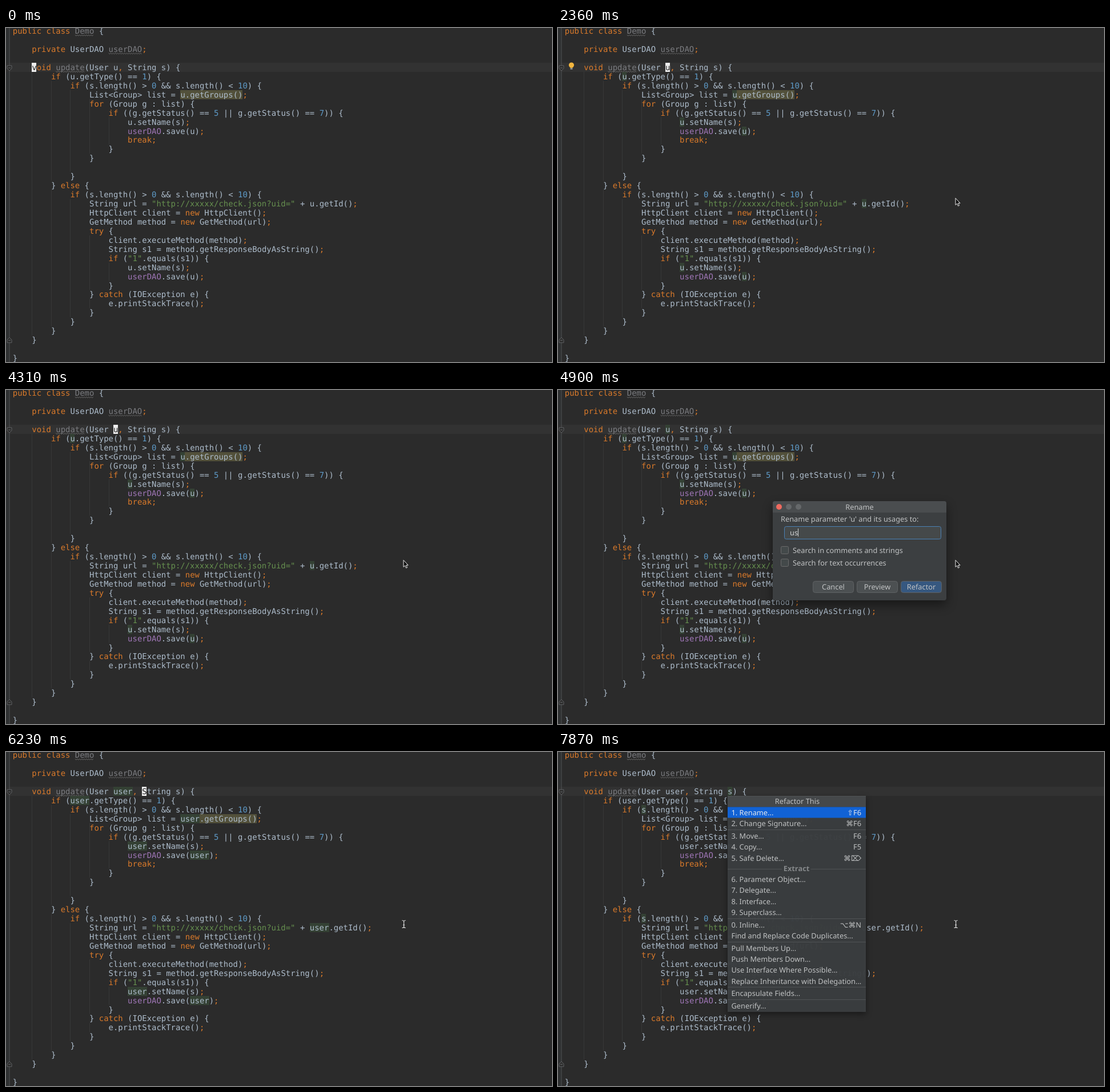
An HTML page with a canvas that plays this animation: 956 by 586 pixels, repeating every 8 s.

```html
<!DOCTYPE html>
<html lang="en">
<head>
<meta charset="utf-8">
<title>Rename refactoring</title>
<style>
  html, body { margin: 0; width: 100%; height: 100%; overflow: hidden; background: #2b2b2b; }
  canvas { display: block; }
</style>
</head>
<body>
<canvas id="stage" width="956" height="586"></canvas>
<script>
const ctx = document.getElementById('stage').getContext('2d');
const LOOP = 8000;
const X0 = 11.8, COL = 8.388, ROW = 15.94, TOP = -2.7, ASCENT = 12.9;
const MONO = '13.93px "DejaVu Sans Mono", monospace';
const UI = '12.8px "Noto Sans", "DejaVu Sans", sans-serif';
const COLOR = {
  bg: '#2b2b2b', line: '#323232', text: '#adbccb', keyword: '#da7a2b', string: '#66904f',
  number: '#5f9cca', field: '#a077b8', unused: '#7b7c80', usage: '#344134', warn: '#52503a',
  brace: '#3b514d', panel: '#3c3f41', label: '#c0c2c3'
};

const SOURCE = `public class Demo {

    private UserDAO userDAO;

    void update(User u, String s) {
        if (u.getType() == 1) {
            if (s.length() > 0 && s.length() < 10) {
                List<Group> list = u.getGroups();
                for (Group g : list) {
                    if ((g.getStatus() == 5 || g.getStatus() == 7)) {
                        u.setName(s);
                        userDAO.save(u);
                        break;
                    }
                }

            }
        } else {
            if (s.length() > 0 && s.length() < 10) {
                String url = "http://xxxxx/check.json?uid=" + u.getId();
                HttpClient client = new HttpClient();
                GetMethod method = new GetMethod(url);
                try {
                    client.executeMethod(method);
                    String s1 = method.getResponseBodyAsString();
                    if ("1".equals(s1)) {
                        u.setName(s);
                        userDAO.save(u);
                    }
                } catch (IOException e) {
                    e.printStackTrace();
                }
            }
        }
    }

}`;
const KEYWORDS = /^(public|class|private|void|if|for|break|else|new|try|catch|[;,])$/;

// column, first row, last row
const GUIDES = [[4, 5, 33], [8, 6, 16], [8, 18, 32], [12, 7, 15], [12, 19, 31],
  [16, 8, 13], [16, 23, 28], [16, 30, 30], [20, 10, 12], [20, 26, 27]];

// time, column of the block caret (-1 hides it)
const CARET = [[0, 4], [140, 9], [440, 15], [590, 16], [890, 21], [1920, -1], [2360, 21],
  [2810, -1], [4310, 21], [4450, -1], [5490, 21], [6230, 27], [6380, 34], [7870, -1]];
const USAGES = [[0, ''], [1330, 'u'], [5490, 'user'], [6970, 's']];
const POINTER = [[0, null], [1770, [841, 302]], [1920, [739, 301]], [2070, [695.5, 298]]];
const MENU = [[0, -1], [2810, 21], [4310, -1], [7870, 34]];
const DIALOG = [[0, null], [4450, 'u'], [4900, 'us'], [5050, 'user'], [5340, null]];

const ITEMS = [['1. Rename...', '⇧F6'], ['2. Change Signature...', '⌘F6'], '-',
  ['3. Move...', 'F6'], ['4. Copy...', 'F5'], ['5. Safe Delete...', '⌘⌦'], 'Extract',
  ['6. Parameter Object...'], ['7. Delegate...'], ['8. Interface...'], ['9. Superclass...'], '-',
  ['0. Inline...', '⌥⌘N'], ['Find and Replace Code Duplicates...'], '-',
  ['Pull Members Up...'], ['Push Members Down...'], ['Use Interface Where Possible...'],
  ['Replace Inheritance with Delegation...'], '-', ['Encapsulate Fields...'], '-', ['Generify...']];

const at = (track, t) => track.filter(step => step[0] <= t).pop()[1];
const colX = c => X0 + c * COL;
const rowY = r => TOP + r * ROW;

function rect(x, y, w, h, fill) {
  ctx.fillStyle = fill;
  ctx.fillRect(x, y, w, h);
}

function roundRect(x, y, w, h, r, fill, stroke) {
  ctx.beginPath();
  ctx.roundRect(x, y, w, h, r);
  ctx.fillStyle = fill;
  ctx.fill();
  if (stroke) {
    ctx.strokeStyle = stroke;
    ctx.lineWidth = 1;
    ctx.stroke();
  }
}

function path(points, close) {
  ctx.beginPath();
  points.forEach(([x, y]) => ctx.lineTo(x, y));
  if (close) ctx.closePath();
}

function write(text, x, y, fill, font = UI, align = 'left') {
  ctx.font = font;
  ctx.textAlign = align;
  ctx.fillStyle = fill;
  ctx.fillText(text, x, y);
}

const cell = (c, r, n, fill) => rect(Math.round(colX(c)), Math.round(rowY(r)), Math.round(n * COL), 16, fill);
const code = (text, c, r, fill) => write(text, colX(c), rowY(r) + ASCENT, fill, MONO);

function wave(c, r, n) {
  const pts = [], y = rowY(r) + ASCENT + 2;
  for (let i = 0; i <= n * COL / 2; i++) pts.push([colX(c) + i * 2, y + (i % 2) * 1.6]);
  path(pts);
  ctx.strokeStyle = '#717171';
  ctx.lineWidth = 0.9;
  ctx.stroke();
}

function tokenColor(word, row) {
  if (KEYWORDS.test(word)) return COLOR.keyword;
  if (word[0] === '"') return COLOR.string;
  if (/^\d/.test(word)) return COLOR.number;
  if (/^(Demo|update)$/.test(word)) return COLOR.unused;
  if (word === 'userDAO') return row < 4 ? COLOR.unused : COLOR.field;
  return COLOR.text;
}

function drawGutter() {
  rect(0, 0, 6, 586, '#2f3132');
  rect(0, 61, 956, 16, COLOR.line);
  rect(5.5, 0, 1, 586, '#505254');
  for (const [y, d] of [[66, 1], [552, -1]]) {
    path([[2, y], [10, y], [10, y + 5 * d], [6, y + 9 * d], [2, y + 5 * d]], true);
    ctx.fillStyle = COLOR.bg;
    ctx.fill();
    ctx.strokeStyle = '#606264';
    ctx.lineWidth = 1;
    ctx.stroke();
    rect(4, y + 4 * d - 0.5, 4, 1, '#707274');
  }
  for (const [c, a, b] of GUIDES) rect(Math.round(colX(c)), rowY(a), 1, (b - a + 1) * ROW, '#373838');
}

function drawCode(t) {
  const renamed = t >= 5490, usage = at(USAGES, t), caret = at(CARET, t);
  const text = renamed ? SOURCE.replace(/\bu\b/g, 'user') : SOURCE;
  cell(35, 7, renamed ? 16 : 13, COLOR.warn);
  text.split('\n').forEach((line, r) => {
    for (const m of line.matchAll(/"[^"]*"|\w+|[^\s\w]/g)) {
      const word = m[0], c = m.index, color = tokenColor(word, r);
      if (word === usage) cell(c, r, word.length, COLOR.usage);
      code(word, c, r, color);
      if (color === COLOR.unused) wave(c, r, word.length);
    }
  });
  const line = text.split('\n')[4];
  if (caret === 15) {
    cell(32, 4, 1, COLOR.brace);
    code(')', 32, 4, '#ffef28');
  }
  if (caret >= 0) {
    cell(caret, 4, 1, '#eeeeee');
    code(line[caret], caret, 4, '#222222');
  }
}

function drawBulb() {
  ctx.beginPath();
  ctx.arc(23.5, 65, 4.6, 0, Math.PI * 2);
  ctx.fillStyle = '#f3b63f';
  ctx.fill();
  rect(21.5, 68, 4, 2, '#f3b63f');
  rect(21.5, 70.5, 4, 2, '#a9abad');
}

function shadow(blur, dy, draw) {
  ctx.save();
  ctx.shadowColor = 'rgba(0,0,0,.45)';
  ctx.shadowBlur = blur;
  ctx.shadowOffsetY = dy;
  draw();
  ctx.restore();
}

function drawMenu(column) {
  const x = Math.round(colX(column)), w = 242, mid = x + w / 2;
  shadow(10, 4, () => rect(x, 77, w, 379, 'rgba(60,63,65,.95)'));
  rect(x, 77, w, 19, '#45484a');
  rect(x, 77, w, 1, '#505355');
  write('Refactor This', mid + 1, 90.5, COLOR.label, UI, 'center');
  rect(x, 96.5, w, 19, '#1162d5');
  let y = 106.2;
  for (const item of ITEMS) {
    if (item === '-') {
      rect(x, Math.round(y - 9), w, 1, '#505355');
      y += 2.3;
    } else if (typeof item === 'string') {
      y -= 0.7;
      rect(x, Math.round(y), 95, 1, '#505355');
      rect(x + 146, Math.round(y), w - 146, 1, '#505355');
      write(item, mid - 0.5, y + 4.6, '#85888a', 'bold ' + UI, 'center');
      y += 18.7;
    } else {
      const color = y < 110 ? '#e4e8ee' : COLOR.label;
      write(item[0], x + 6.5, y + 4.6, color);
      if (item[1]) write(item[1], x + 234, y + 4.6, color, UI, 'right');
      y += 19.35;
    }
  }
}

function drawDialog(name) {
  const fresh = name === 'u';
  shadow(18, 8, () => roundRect(376, 195, 304, 174, 4, COLOR.panel));
  roundRect(376, 195, 304, 20, [4, 4, 0, 0], '#4a4d4f');
  ['#ee6a5f', '#65686a', '#65686a'].forEach((fill, i) => {
    ctx.beginPath();
    ctx.arc(387 + i * 17, 205, 5, 0, Math.PI * 2);
    ctx.fillStyle = fill;
    ctx.fill();
  });
  write('Rename', 528, 209.5, COLOR.label, UI, 'center');
  write("Rename parameter 'u' and its usages to:", 390, 231, COLOR.label);
  roundRect(396.5, 239.5, 274, 22, 3, '#45494a', '#4a81b5');
  if (fresh) rect(406, 242, 8, 16, '#2f65ca');
  write(name, 406, 254.5, '#d0d2d3');
  ctx.font = UI;
  rect(406 + ctx.measureText(name).width, 243, 1, 14, '#d0d2d3');
  ['Search in comments and strings', 'Search for text occurrences'].forEach((label, i) => {
    const y = 274 + i * 22;
    roundRect(390.5, y + 0.5, 13, 13, 2, '#43494a', '#6b6b6b');
    write(label, 411, y + 11.5, COLOR.label);
  });
  ['Cancel', 'Preview', 'Refactor'].forEach((label, i) => {
    const x = 446.5 + i * 77, off = fresh && i > 0;
    const fill = off ? '#404345' : i === 2 ? '#365880' : '#4c5052';
    roundRect(x, 335.5, 71, 20, 4, fill, '#5e6163');
    write(label, x + 35.5, 350, off ? '#777777' : COLOR.label, UI, 'center');
  });
}

function drawPointer(t) {
  const spot = at(POINTER, t);
  if (!spot) return;
  ctx.save();
  if (t < 5340) {
    ctx.translate(...spot);
    path([[0.5, 0.5], [0.5, 12.5], [3.2, 10], [5, 14.3], [7, 13.4], [5.2, 9.3], [8.6, 9.3]], true);
    ctx.fillStyle = '#111111';
    ctx.fill();
    ctx.strokeStyle = '#eeeeee';
    ctx.lineWidth = 1;
    ctx.stroke();
  } else {
    ctx.strokeStyle = '#d8d8d8';
    ctx.lineWidth = 1.2;
    ctx.beginPath();
    for (const [y, d] of [[295.5, 1], [308.5, -1]]) {
      ctx.moveTo(693.5, y);
      ctx.quadraticCurveTo(696.6, y, 696.6, y + 2 * d);
      ctx.quadraticCurveTo(696.6, y, 699.7, y);
    }
    ctx.moveTo(696.6, 297);
    ctx.lineTo(696.6, 307);
    ctx.moveTo(695, 303.5);
    ctx.lineTo(698.2, 303.5);
    ctx.stroke();
  }
  ctx.restore();
}

function draw(t) {
  ctx.textRendering = 'geometricPrecision';
  rect(0, 0, 956, 586, COLOR.bg);
  drawGutter();
  drawCode(t);
  if (t >= 1770 && t < 2810) drawBulb();
  const menu = at(MENU, t), dialog = at(DIALOG, t);
  if (menu >= 0) drawMenu(menu);
  if (dialog) drawDialog(dialog);
  drawPointer(t);
}

const start = performance.now();
function tick() {
  draw((performance.now() - start) % LOOP);
  requestAnimationFrame(tick);
}
tick();
</script>
</body>
</html>
```
